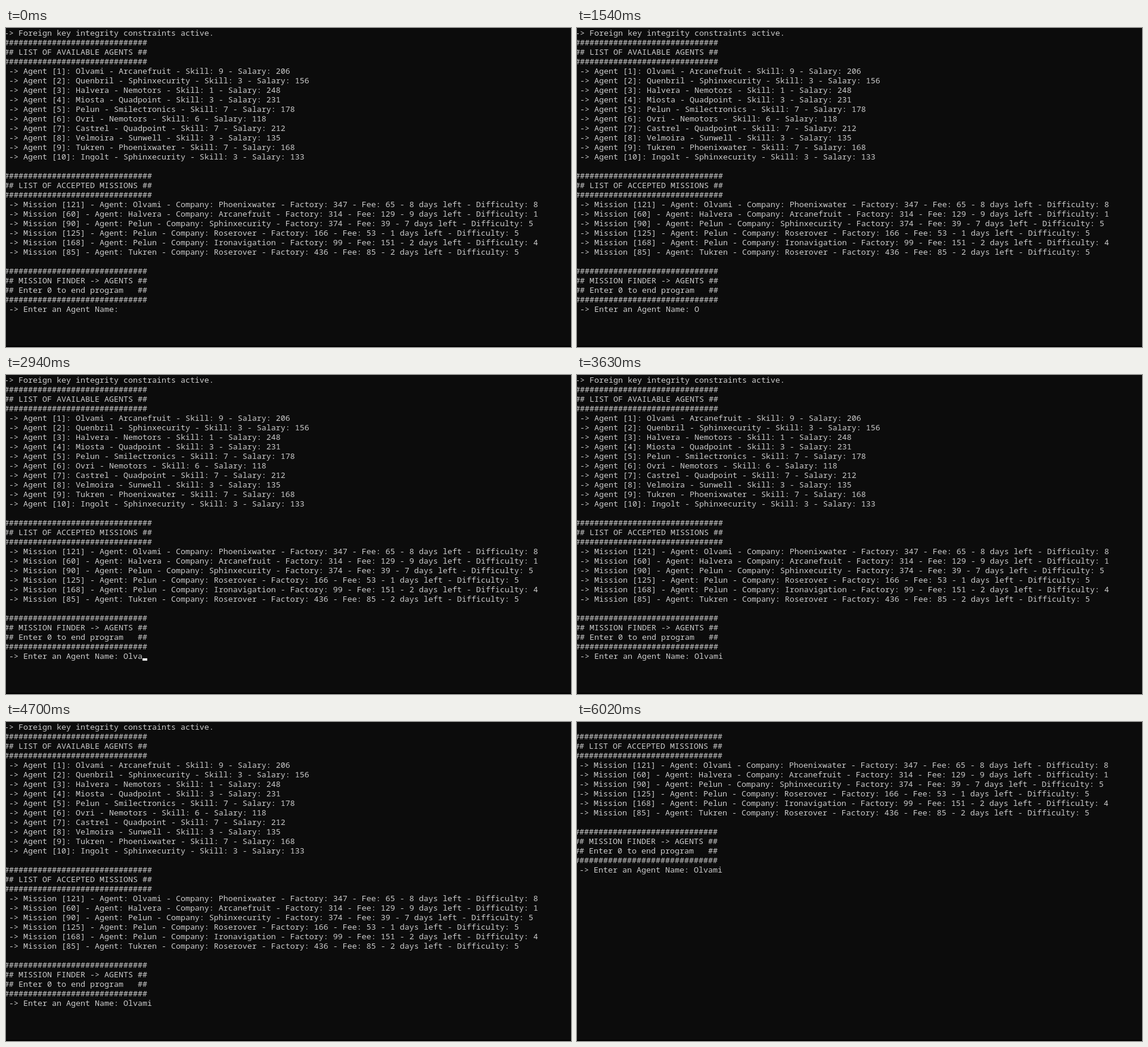
Write an HTML page that moves like this. It is 948 by 536 pixels and loops after 8 s.

```html
<!DOCTYPE html>
<html lang="en">
<head>
<meta charset="utf-8">
<title>Mission finder</title>
<style>
  html, body { margin: 0; width: 100%; height: 100%; overflow: hidden; background: #0c0c0c; }
  #stage { position: relative; width: 948px; height: 536px; overflow: hidden; background: #0c0c0c; }
  #stage::after { content: ""; position: absolute; left: 0; right: 0; bottom: 0; height: 2px; background: #000; }
  #screen {
    position: absolute; left: -3px; top: 0; margin: 0; white-space: pre;
    font: 13.3333px/16px "Noto Sans Mono", "DejaVu Sans Mono", monospace;
    font-variant-ligatures: none; color: #ccc;
  }
  #cursor { position: absolute; top: 476px; width: 8px; height: 4px; background: #f2f2f2; }
</style>
</head>
<body>
<div id="stage"><pre id="screen"></pre><div id="cursor"></div></div>
<script>
const LOOP = 8000, CELL = 8, ROW = 16, PROMPT_X = 197, SCROLLED_ROWS = 14;
const NAME = "Olvami";

const agents = [
  [NAME, "Arcanefruit", 9, 206],
  ["Quenbril", "Sphinxecurity", 3, 156],
  ["Halvera", "Nemotors", 1, 248],
  ["Miosta", "Quadpoint", 3, 231],
  ["Pelun", "Smilectronics", 7, 178],
  ["Ovri", "Nemotors", 6, 118],
  ["Castrel", "Quadpoint", 7, 212],
  ["Velmoira", "Sunwell", 3, 135],
  ["Tukren", "Phoenixwater", 7, 168],
  ["Ingolt", "Sphinxecurity", 3, 133],
];

const missions = [
  [121, NAME, "Phoenixwater", 347, 65, 8, 8],
  [60, "Halvera", "Arcanefruit", 314, 129, 9, 1],
  [90, "Pelun", "Sphinxecurity", 374, 39, 7, 5],
  [125, "Pelun", "Roserover", 166, 53, 1, 5],
  [168, "Pelun", "Ironavigation", 99, 151, 2, 4],
  [85, "Tukren", "Roserover", 436, 85, 2, 5],
];

// Start time, letters typed, cursor shown, scrolled up
const steps = [
  [0, 0, 0], [1030, 0, 1],
  [1410, 1, 1], [1540, 1, 0],
  [1950, 2, 1], [2050, 2, 0],
  [2510, 3, 1], [2560, 3, 0],
  [2940, 4, 1], [3120, 4, 0],
  [3250, 5, 1], [3480, 6, 1], [3630, 6, 0],
  [4170, 6, 1], [4700, 6, 0],
  [5190, 6, 1], [5700, 6, 0],
  [6020, 6, 0, 1],
];

function banner(...titles) {
  const rule = "#".repeat(titles[0].length + 6);
  return [rule, ...titles.map(title => `## ${title} ##`), rule];
}

const lines = [
  "-> Foreign key integrity constraints active.",
  ...banner("LIST OF AVAILABLE AGENTS"),
  ...agents.map(([name, company, skill, salary], i) =>
    ` -> Agent [${i + 1}]: ${name} - ${company} - Skill: ${skill} - Salary: ${salary}`),
  "",
  ...banner("LIST OF ACCEPTED MISSIONS"),
  ...missions.map(([id, name, company, factory, fee, days, difficulty]) =>
    ` -> Mission [${id}] - Agent: ${name} - Company: ${company} - Factory: ${factory}` +
    ` - Fee: ${fee} - ${days} days left - Difficulty: ${difficulty}`),
  "",
  ...banner("MISSION FINDER -> AGENTS", "Enter 0 to end program  "),
  " -> Enter an Agent Name: ",
];

const screen = document.getElementById("screen");
const cursor = document.getElementById("cursor");
const pageText = lines.join("\n");
const start = performance.now();
let shown;

function show([, typed, cursorOn, scrolled]) {
  screen.textContent = pageText + NAME.slice(0, typed);
  screen.style.left = scrolled ? "-4px" : "-3px";
  screen.style.top = scrolled ? `${-SCROLLED_ROWS * ROW}px` : "0";
  cursor.style.left = `${PROMPT_X + typed * CELL}px`;
  cursor.style.visibility = cursorOn ? "visible" : "hidden";
}

function tick() {
  const time = (performance.now() - start) % LOOP;
  const step = steps.findLast(([from]) => from <= time);
  if (step !== shown) show(shown = step);
  requestAnimationFrame(tick);
}
tick();
</script>
</body>
</html>
```
